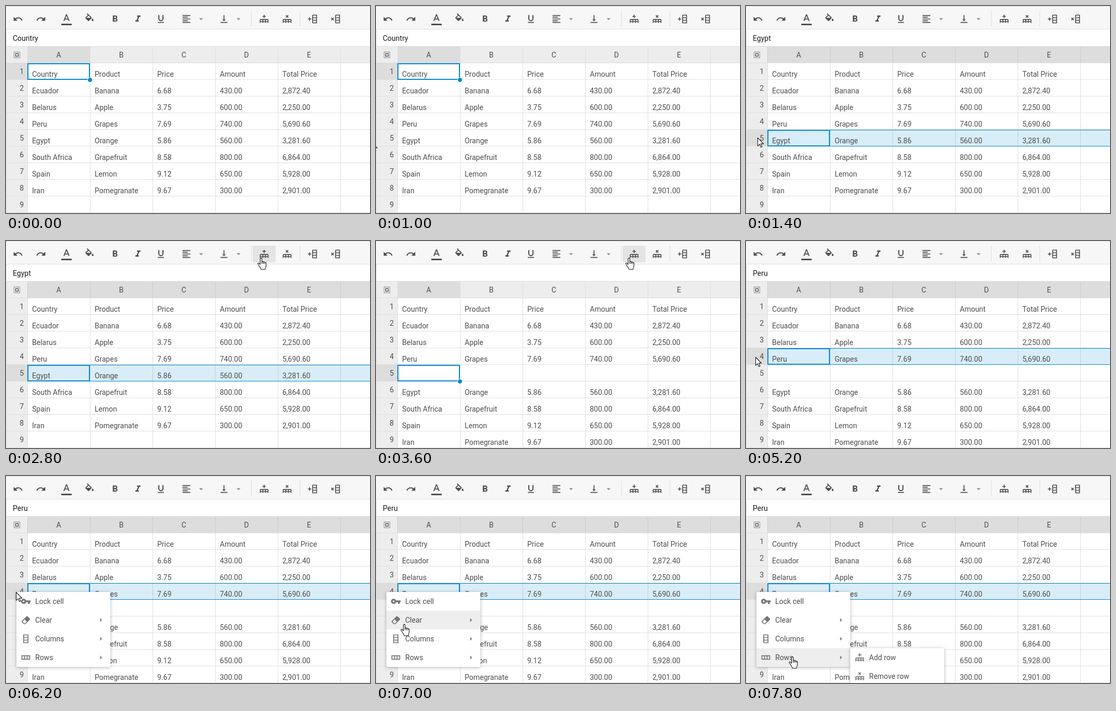
These frames come from a looping animation (698 px wide and 398 px high, 8 s). An HTML page:

```html
<!DOCTYPE html>
<html lang="en">
<head>
<meta charset="utf-8">
<title>Spreadsheet rows</title>
<style>
html, body { margin: 0; width: 100%; height: 100%; overflow: hidden; background: #fff; }
svg { display: block; width: 698px; height: 398px; font: 14px Roboto, Arial, sans-serif; }
.panel { filter: drop-shadow(0 1px 3px rgba(0, 0, 0, .3)); }
</style>
</head>
<body>
<svg id="stage" viewBox="0 0 698 398"></svg>
<script>
const LOOP = 8000, STEP = 200;
const INK = '#4d4d4d', LINE = '#dfdfdf', HEAD = '#ededed', MARK = '#dddddd', BLUE = '#0288d1';
const ROW_H = 32, TOP = 110, LEFT = 42, COL_W = 120;

const cross = (x, y) =>
  `M${x - 3.4},${y - 2}l1.4-1.4 2,2 2-2 1.4,1.4-2,2 2,2-1.4,1.4-2-2-2,2-1.4-1.4 2-2z`;
const rowTable = 'M22,14A2,2 0 0,0 20,12H4A2,2 0 0,0 2,14V21H4V19H8V21H10V19H14V21H16V19H20V21H22V14M4,14H8V17H4V14M10,14H14V17H10V14M20,14V17H16V14H20';
const colTable = 'M13,2A2,2 0 0,0 11,4V20A2,2 0 0,0 13,22H22V2H13M20,10V14H13V10H20M20,16V20H13V16H20M20,4V8H13V4H20';

// Icon paths on a 24 unit grid
const ICONS = {
  undo: 'M12.5,8C9.85,8 7.45,9 5.6,10.6L2,7V16H11L7.38,12.38C8.77,11.22 10.54,10.5 12.5,10.5C16.04,10.5 19.05,12.81 20.1,16L22.47,15.22C21.08,11.03 17.15,8 12.5,8Z',
  redo: 'M18.4,10.6C16.55,9 14.15,8 11.5,8C6.85,8 2.92,11.03 1.53,15.22L3.9,16C4.95,12.81 7.96,10.5 11.5,10.5C13.46,10.5 15.23,11.22 16.62,12.38L13,16H22V7L18.4,10.6Z',
  color: 'M9.62,12L12,5.67L14.37,12M11,3L5.5,17H7.75L8.87,14H15.12L16.25,17H18.5L13,3H11Z',
  fill: 'M19,11.5C19,11.5 17,13.67 17,15A2,2 0 0,0 19,17A2,2 0 0,0 21,15C21,13.67 19,11.5 19,11.5M5.21,10L10,5.21L14.79,10M16.56,8.94L7.62,0L6.21,1.41L8.59,3.79L3.44,8.94C2.85,9.5 2.85,10.47 3.44,11.06L8.94,16.56C9.23,16.85 9.62,17 10,17C10.38,17 10.77,16.85 11.06,16.56L16.56,11.06C17.15,10.47 17.15,9.5 16.56,8.94Z',
  bold: 'M13.5,15.5H10V12.5H13.5A1.5,1.5 0 0,1 13.5,15.5M10,6.5H13A1.5,1.5 0 0,1 13,9.5H10M15.6,10.79C16.57,10.11 17.25,9 17.25,8C17.25,5.74 15.5,4 13.25,4H7V18H14.04C16.14,18 17.75,16.3 17.75,14.21C17.75,12.69 16.89,11.39 15.6,10.79Z',
  italic: 'M10,4V7H12.21L8.79,15H6V18H14V15H11.79L15.21,7H18V4H10Z',
  underline: 'M5,21H19V19H5V21M12,17A6,6 0 0,0 18,11V3H15.5V11A3.5,3.5 0 0,1 8.5,11V3H6V11A6,6 0 0,0 12,17Z',
  align: 'M3,3H21V5H3V3M3,7H15V9H3V7M3,11H21V13H3V11M3,15H15V17H3V15M3,19H21V21H3V19Z',
  bottom: 'M16,13H13V3H11V13H8L12,17L16,13M4,19V21H20V19H4Z',
  caret: 'M7,10L12,15L17,10H7Z',
  next: 'M10,7L15,12L10,17V7Z',
  addRow: rowTable + 'M11,10H13V7H16V5H13V2H11V5H8V7H11V10Z',
  delRow: rowTable + cross(12, 6),
  addCol: colTable + 'M9,11H6V8H4V11H1V13H4V16H6V13H9V11Z',
  delCol: colTable + cross(5, 12),
  key: 'M12.65,10C11.83,7.67 9.61,6 7,6A6,6 0 0,0 7,18C9.61,18 11.83,16.33 12.65,14H17V18H21V14H23V10H12.65ZM7,14A2,2 0 0,1 7,10A2,2 0 0,1 7,14Z',
  eraser: 'M16.24,3.56L21.19,8.5C21.97,9.29 21.97,10.55 21.19,11.34L12,20.53C10.44,22.09 7.91,22.09 6.34,20.53L2.81,17C2.03,16.21 2.03,14.95 2.81,14.16L13.41,3.56C14.2,2.78 15.46,2.78 16.24,3.56M4.22,15.58L7.76,19.11C8.54,19.9 9.8,19.9 10.59,19.11L14.12,15.58L9.17,10.63L4.22,15.58Z',
  cols: 'M6,2h12v20h-12zM8,4v4h8v-4zM8,10v4h8v-4zM8,16v4h8v-4z',
  rows: 'M2,7h20v10h-20zM4,9v6h4v-6zM10,9v6h4v-6zM16,9v6h4v-6z'
};

const TOOLS = [
  ['undo', 23], ['redo', 67], ['bold', 209], ['italic', 253], ['underline', 297],
  ['align', 346], ['bottom', 418], ['addRow', 495], ['delRow', 539], ['addCol', 588], ['delCol', 632]
];

const MENU = [['key', 'Lock cell'], ['eraser', 'Clear', true], ['cols', 'Columns', true], ['rows', 'Rows', true]];
const SUBMENU = [['addRow', 'Add row'], ['delRow', 'Remove row']];

const GOODS = [
  ['Ecuador', 'Banana', 6.68, 430], ['Belarus', 'Apple', 3.75, 600], ['Peru', 'Grapes', 7.69, 740],
  ['Egypt', 'Orange', 5.86, 560], ['South Africa', 'Grapefruit', 8.58, 800],
  ['Spain', 'Lemon', 9.12, 650], ['Iran', 'Pomegranate', 9.67, 300]
];
const money = n => n.toLocaleString('en-US', { minimumFractionDigits: 2, maximumFractionDigits: 2 });
const SHEET = [
  ['Country', 'Product', 'Price', 'Amount', 'Total Price'],
  ...GOODS.map(([land, item, price, amount]) => [land, item, money(price), money(amount), money(price * amount)])
];
const SHEET_ADDED = [...SHEET.slice(0, 4), [], ...SHEET.slice(4)];

// Selection: start time, row, whole row or single cell
const PICKS = [[0, 1, false], [1400, 5, true], [3200, 5, false], [5000, 4, true]];
const INSERT_AT = 3200, MENU_AT = 6200;

// Pointer tip: time, x, y
const PATH = [
  [800, -20, 264], [1400, 22, 253], [1600, 22, 253], [2600, 489, 33], [2800, 489, 33],
  [3200, 485, 33], [3600, 485, 33], [5000, 18, 223], [5600, 18, 223], [5800, 19, 223],
  [6600, 19, 223], [7400, 89, 348], [8000, 89, 348]
];

const ease = p => p * p * (3 - 2 * p);

function pointerAt(t) {
  if (t <= PATH[0][0]) return PATH[0].slice(1);
  const i = PATH.findIndex(k => k[0] >= t);
  const [t0, x0, y0] = PATH[i - 1], [t1, x1, y1] = PATH[i];
  const p = ease((t - t0) / (t1 - t0));
  return [x0 + (x1 - x0) * p, y0 + (y1 - y0) * p];
}

const rect = (x, y, w, h, fill, more = '') =>
  `<rect x="${x}" y="${y}" width="${w}" height="${h}" fill="${fill}" ${more}/>`;
const text = (x, y, s, fill = INK, anchor = 'start') =>
  `<text x="${x}" y="${y}" fill="${fill}" text-anchor="${anchor}">${s}</text>`;
const icon = (name, cx, cy, fill = INK, size = 20) =>
  `<path d="${ICONS[name]}" fill="${fill}" fill-rule="evenodd" transform="translate(${cx - size / 2} ${cy - size / 2}) scale(${size / 24})"/>`;

const rowY = r => TOP + (r - 1) * ROW_H;

function toolbar(hover) {
  let s = rect(0, 0, 698, 45, '#f7f7f7') + rect(0, 0, 698, 1, LINE) + rect(0, 44, 698, 1, LINE);
  if (hover) s += rect(473, 9, 44, 32, '#e4e4e4', 'rx="2"');
  s += rect(470, 9, 1, 30, LINE) + rect(563, 9, 1, 30, LINE);
  for (const [name, x] of TOOLS) s += icon(name, x, 25);
  s += icon('color', 116, 24.2, INK, 22) + rect(106, 34, 20, 3, INK);
  s += icon('fill', 160, 24.5, INK, 21);
  return s + icon('caret', 374, 25, '#8c8c8c', 18) + icon('caret', 446, 25, '#8c8c8c', 18);
}

function selectAll() {
  return `<g fill="none" stroke="${INK}"><rect x="15.5" y="88.5" width="11" height="11" stroke-dasharray="1.3 1.45" stroke-width="1.3"/>` +
    '<rect x="18.5" y="91.5" width="5" height="5" stroke-width="1.3"/></g>';
}

function grid(cells, row, whole) {
  const y = rowY(row);
  let s = rect(0, 45, 698, 353, '#fff') + rect(0, 77, 698, 33, HEAD) + rect(0, 77, 41, 321, HEAD);
  s += rect(LEFT, 78, whole ? 656 : COL_W - 1, 31, MARK) + rect(1, y, 40, 31, MARK);
  s += rect(0, 77, 698, 1, LINE) + rect(0, 109, 698, 1, LINE);
  for (let r = 1; r <= 9; r++) s += rect(0, rowY(r) + 31, 698, 1, LINE);
  for (let c = 0; c <= 5; c++) {
    const x = LEFT - 1 + c * COL_W;
    s += rect(x, 77, 1, 321, LINE);
    if (whole) s += rect(x, 78, 1, 31, '#cccccc');
  }
  s += rect(0, 0, 1, 398, LINE) + selectAll();

  if (whole) {
    s += rect(LEFT, y, 656, 32, BLUE, 'fill-opacity=".15"');
    s += rect(LEFT, y, 656, 1, BLUE) + rect(LEFT, y + 31, 656, 1, BLUE);
  }
  for (let c = 0; c < 5; c++) s += text(101 + c * COL_W, 99, 'ABCDE'[c], INK, 'middle');
  for (let r = 1; r <= 9; r++) {
    s += text(34, rowY(r) + 21, r, INK, 'end');
    (cells[r - 1] || []).forEach((v, c) => s += text(50 + c * COL_W, rowY(r) + 26, v));
  }
  s += rect(LEFT, y + 1, COL_W - 2, 30, 'none', `stroke="${BLUE}" stroke-width="2"`);
  if (!whole) s += `<circle cx="161" cy="${y + 32}" r="4.5" fill="${BLUE}" stroke="#fff"/>`;
  return s + text(13, 67, (cells[row - 1] || [])[0] || '', '#1a1a1a');
}

function panel(x, y, items, active) {
  let s = `<g class="panel">${rect(x, y, 180, items.length * 36, '#fff', 'rx="2"')}</g>`;
  items.forEach(([name, label, more], i) => {
    const cy = y + 18 + i * 36;
    if (i === active) s += rect(x, cy - 18, 180, 36, '#eeeeee');
    s += icon(name, x + 18, cy, '#757575') + text(x + 36, cy + 5, label);
    if (more) s += icon('next', x + 162, cy, '#808080', 18);
  });
  return s;
}

function pointer(x, y, hand) {
  const shape = hand
    ? `<g transform="translate(${x - 7} ${y - 1})"><path d="M5.5,13V2.2a1.6,1.6 0 0 1 3.2,0V8.2a1.5,1.5 0 0 1 2.8,.6a1.5,1.5 0 0 1 2.7,.6a1.4,1.4 0 0 1 2.4,1V15.5c0,2.5-1.6,3.5-1.6,7H7c0-2-2-4.4-3.5-6.7L1,12.2c-.9-1.5 1-2.6 2.2-1.4Z"/><path d="M8.7,8.2V12M11.5,9V12M14.2,9.8V12"/>`
    : `<g transform="translate(${x} ${y})"><path d="M.5,.5V16.3L4.2,12.8L6.7,18.6L9,17.6L6.5,11.9H11.6Z"/>`;
  return `<g fill="#fff" stroke="#111" stroke-width="1.1" stroke-linejoin="round">${shape}</g></g>`;
}

function draw(t) {
  const [x, y] = pointerAt(t);
  const [, row, whole] = PICKS.filter(p => p[0] <= t).pop();
  const onTool = x >= 473 && x < 517 && y >= 9 && y < 41;
  const open = t >= MENU_AT;
  const active = open && x >= 20 ? Math.floor((y - 223) / 36) : -1;

  let s = grid(t >= INSERT_AT ? SHEET_ADDED : SHEET, row, whole) + toolbar(onTool);
  if (open) s += panel(20, 223, MENU, active);
  if (active === 3) s += panel(200, 331, SUBMENU, -1);
  return s + pointer(x, y, onTool || active >= 0);
}

const stage = document.getElementById('stage');
let shown = -1;
function tick() {
  const t = Math.floor(performance.now() % LOOP / STEP) * STEP;
  if (t !== shown) stage.innerHTML = draw(shown = t);
  requestAnimationFrame(tick);
}
tick();
</script>
</body>
</html>
```
